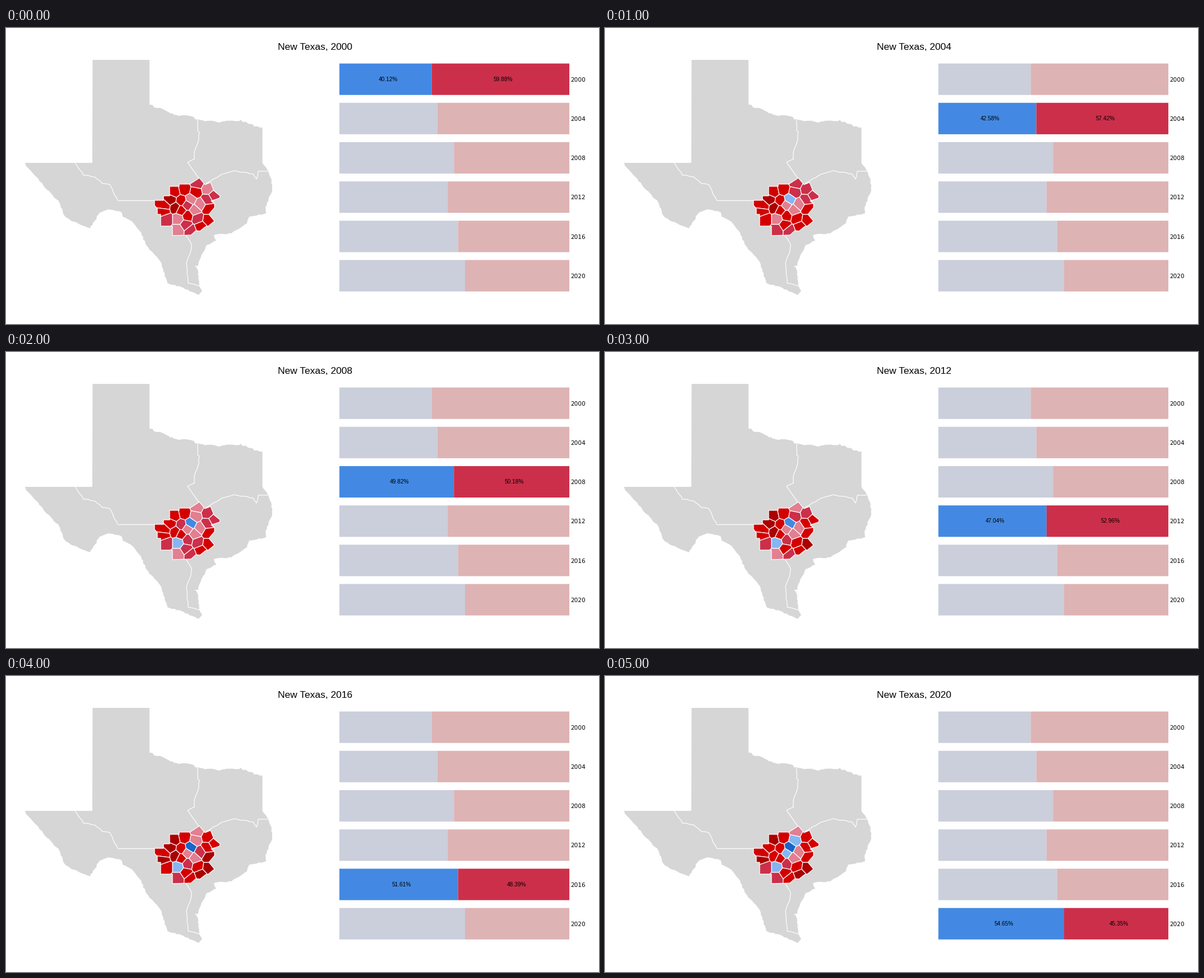
Recreate the animation shown at these times as a matplotlib script. Size 1058x529 px, loop 6 s.

```python
import matplotlib.pyplot as plt
import numpy as np
from matplotlib.animation import FuncAnimation
from matplotlib.patches import Polygon, Rectangle

WIDTH, HEIGHT, DPI = 1058, 529, 100
PX = 72 / DPI  # points per pixel
rng = np.random.default_rng(7)

YEARS = range(2000, 2021, 4)
BLUE_SHARE = [40.12, 42.58, 49.82, 47.04, 51.61, 54.65]

LAND = "#d6d6d6"
BLUE, RED = "#4389e3", "#cc2f4a"
PALE_BLUE, PALE_RED = "#cbcedb", "#deb3b4"
# Margin classes: lower case b is a narrow blue lead, N the widest one.
SHADES = {"L": "#e27f90", "M": RED, "R": "#d40000", "D": "#aa0000",
          "b": "#86b6f2", "B": BLUE, "N": "#1666cb"}

# One centre and one margin class per election for each county.
COUNTIES = [
    (300, 293, "RRRDDD"), (319, 289, "RRRRRR"), (341, 278, "MMLLLL"),
    (360, 288, "LMMMRR"), (338, 293, "RMLMLb"), (329, 306, "LbBBNN"),
    (371, 300, "MMMRRR"), (359, 307, "MMMRRR"), (347, 315, "LLLLML"),
    (294, 307, "DDRDDR"), (313, 309, "RRMRRR"), (302, 321, "DDRDDR"),
    (283, 319, "RRRRRR"), (282, 327, "RRRRDD"), (323, 316, "MLLLLb"),
    (312, 326, "RRRRRR"), (337, 326, "LLLLLL"), (324, 336, "RRMMMM"),
    (307, 341, "LLbbbb"), (287, 341, "MRMMRM"), (307, 361, "LMLLMM"),
    (321, 352, "MRMRRR"), (342, 340, "MRMRRR"), (329, 362, "MMMMRR"),
    (348, 355, "RRRRDD"), (361, 343, "RRRDDD"), (361, 323, "RRRRDR")]

BAR_LEFT, BAR_RIGHT = 594.8, 1005.1
BAR_TOP, BAR_STEP = 0.12 * HEIGHT, 70.23
BAR_WIDTH, BAR_HEIGHT = BAR_RIGHT - BAR_LEFT, 0.8 * BAR_STEP

fig = plt.figure(figsize=(WIDTH / DPI, HEIGHT / DPI), dpi=DPI, facecolor="white")
ax = fig.add_axes([0, 0, 1, 1])
ax.set_xlim(0, WIDTH)
ax.set_ylim(HEIGHT, 0)
ax.axis("off")


def rough(points, jitter=1.5, step=4):
    """Join key points with a line that wanders like a river bank."""
    points = np.array(points, float)
    parts = []
    for a, b in zip(points, points[1:]):
        t = np.linspace(0, 1, max(1, int(np.hypot(*(b - a)) / step)), endpoint=False)
        noise = rng.uniform(-jitter, jitter, (len(t), 2))
        noise[0] = 0
        parts.append(a + np.outer(t, b - a) + noise)
    return np.vstack(parts + [points[-1:]])


def clip(shape, normal, limit):
    """Keep the part of a shape where point . normal <= limit."""
    kept = []
    for a, b in zip(shape, np.roll(shape, -1, axis=0)):
        side_a, side_b = a @ normal - limit, b @ normal - limit
        if side_a <= 0:
            kept.append(a)
        if side_a * side_b < 0:
            kept.append(a + (b - a) * side_a / (side_a - side_b))
    return np.array(kept)


def nearest_cell(centre, centres, shape):
    """The part of a shape that is closer to one centre than to the others."""
    for other in centres:
        if (other != centre).any():
            normal = other - centre
            shape = clip(shape, normal, normal @ (other + centre) / 2)
    return shape


def border(points, jitter=0.8):
    ax.plot(*rough(points, jitter, 5).T, color="white", lw=1.2 * PX)


panhandle = [(34, 241), (154, 241), (154.5, 57), (256, 57)]
red_river = [(256, 137), (282, 146), (300, 155), (319, 156), (342, 163),
             (381, 169), (419, 164), (432, 171), (457.5, 178)]
gulf = [(457.5, 241), (466, 253), (474, 272), (475, 290), (463, 320),
        (464, 331), (434, 337), (430, 349), (402, 367), (371, 370), (375, 380),
        (358, 388), (345, 415), (343, 425), (337, 425), (342, 432), (345, 461),
        (350, 470), (344, 477)]
rio_grande = [(344, 477), (313, 463), (288, 456), (276, 418), (251, 389),
              (238, 362), (222, 344), (208, 337), (206, 329), (183, 324),
              (167, 330), (150, 358), (120, 346), (104, 335), (93, 308),
              (70, 286), (58, 270), (36, 247)]
state = np.vstack([panhandle, rough(red_river, 2), rough(gulf, 1), rough(rio_grande, 1)])
ax.add_patch(Polygon(state, facecolor=LAND, edgecolor="none"))

border([(342, 163), (342, 184), (345, 186), (344, 199), (336, 222), (336, 234)])
border([(336, 234), (324, 240), (345, 270)], 0)
border([(357, 278), (386, 261), (407, 255), (441, 261), (447, 270), (450, 256), (467, 256)])
border([(123, 240), (138, 263), (158, 266), (172, 278), (185, 280), (199, 307)])
border([(199, 307.5), (282, 307.5)], 0)
border([(320, 370), (331, 387), (330, 398), (322, 419), (325, 456), (345, 461)])

region = np.array([
    (265, 308), (281, 308), (281, 300), (292, 300), (292, 283), (309, 283),
    (309, 279), (328, 279), (345, 268), (355, 280), (365, 276), (371, 291),
    (382, 300), (381, 304), (366, 309), (372, 314), (372, 321), (362, 333),
    (372, 345), (361, 354), (356, 355), (346, 363), (339, 362), (330, 370),
    (297, 371), (297, 354), (276, 354), (276, 333), (270, 333), (270, 323),
    (265, 317)], float)
centres = np.array([(x, y) for x, y, _ in COUNTIES], float)
counties = [ax.add_patch(Polygon(nearest_cell(centre, centres, region), zorder=3,
                                 edgecolor="white", lw=1.2 * PX, joinstyle="round"))
            for centre in centres]


def label(x, y, text, size, font="Liberation Sans", ha="center"):
    return ax.text(x, y, text, fontsize=size * PX, family=font, ha=ha,
                   va="baseline", color="black", zorder=4)


def bar(x, y, width):
    return ax.add_patch(Rectangle((x, y), width, BAR_HEIGHT, lw=0, snap=False))


title = label(551.7, 39, "", 17.4)
rows = []
for i, (year, share) in enumerate(zip(YEARS, BLUE_SHARE)):
    top = BAR_TOP + i * BAR_STEP
    x, halves = BAR_LEFT, []
    for percent in (share, 100 - share):
        width = BAR_WIDTH * percent / 100
        text = label(x + width / 2 + 5, top + 31.2, f"{percent:.2f}%", 10.1)
        halves.append((bar(x, top, width), text))
        x += width
    label(1007.5, top + 32.3, str(year), 10.5, "DejaVu Sans", "left")
    rows.append(halves)


def draw(index):
    title.set_text(f"New Texas, {YEARS[index]}")
    for patch, (_, _, classes) in zip(counties, COUNTIES):
        patch.set_facecolor(SHADES[classes[index]])
    for i, halves in enumerate(rows):
        colors = (BLUE, RED) if i == index else (PALE_BLUE, PALE_RED)
        for (patch, text), color in zip(halves, colors):
            patch.set_facecolor(color)
            text.set_visible(i == index)


animation = FuncAnimation(fig, draw, frames=len(YEARS), interval=1000,
                          init_func=lambda: draw(0), repeat=True, repeat_delay=0)
plt.show()
```
